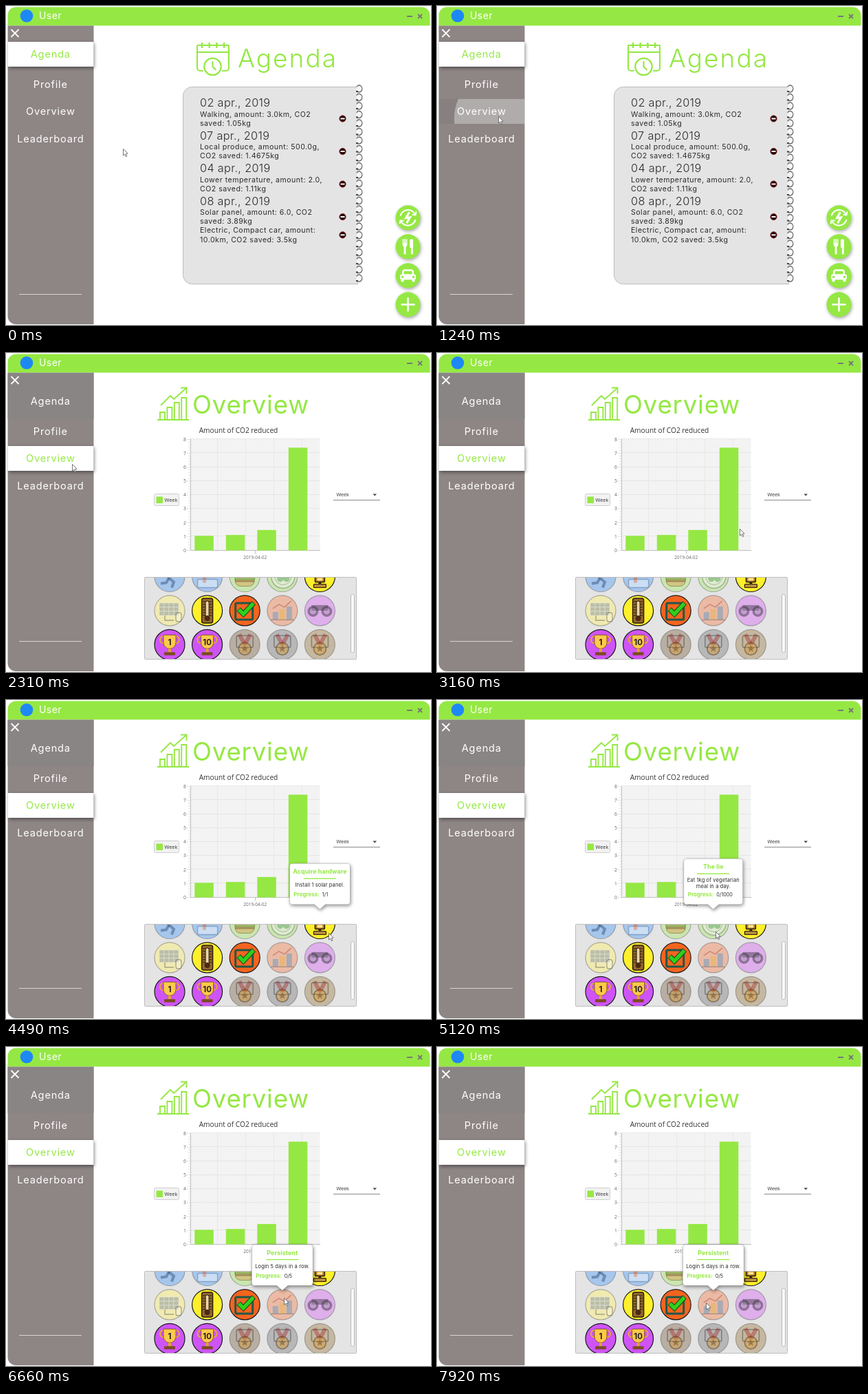
Recreate the animation shown at these times as an HTML page with a canvas. Size 618 px wide and 463 px high, loop 7990 ms.

```html
<!DOCTYPE html>
<html lang="en">
<head>
<meta charset="utf-8">
<title>Agenda and overview</title>
<style>
html, body { margin: 0; width: 100%; height: 100%; overflow: hidden; background: #fff; }
canvas { display: block; width: 100vw; height: 100vh; }
</style>
</head>
<body>
<canvas id="stage" width="618" height="463"></canvas>
<script>
const ctx = document.getElementById('stage').getContext('2d');
const LOOP = 7990, TICK = 76, SWITCH = 1380;
const GREEN = '#95e843', SIDE = '#8e8585', INK = '#2b2b2b';
const SANS = 'Inter, "Open Sans", sans-serif';

// ---------- helpers ----------
const smooth = v => v * v * (3 - 2 * v);
const times = (n, f) => Array.from({ length: n }, (_, i) => f(i));

// Progress in equal jumps, one per tick, the first at a and the last at b.
function steps(t, a, b) {
  if (t < a) return 0;
  if (t >= b) return 1;
  const n = Math.round((b - a) / TICK);
  return (Math.floor((t - a) / (b - a) * n + 1e-6) + 1) / (n + 1);
}

function setFont(size, w = 400, gap = 0.02, font = SANS) {
  ctx.font = `${w} ${size}px ${font}`;
  ctx.letterSpacing = gap * size + 'px';
}

function text(s, x, y, size, color, { w, align = 'left', gap, font } = {}) {
  setFont(size, w, gap, font);
  ctx.textAlign = align;
  ctx.fillStyle = color;
  ctx.fillText(s, x, y);
}

function rect(x, y, w, h, color) {
  ctx.fillStyle = color;
  ctx.fillRect(x, y, w, h);
}

function paint(fill, stroke, lw = 1) {
  if (fill) { ctx.fillStyle = fill; ctx.fill(); }
  if (stroke) { ctx.strokeStyle = stroke; ctx.lineWidth = lw; ctx.stroke(); }
}

function box(x, y, w, h, r, fill, stroke, lw) {
  ctx.beginPath();
  ctx.roundRect(x, y, w, h, r);
  paint(fill, stroke, lw);
}

function disc(x, y, r, fill, stroke, lw) {
  ctx.beginPath();
  ctx.arc(x, y, r, 0, 7);
  paint(fill, stroke, lw);
}

// Points are a flat list: x, y, x, y ...
function trace(pts, close) {
  ctx.beginPath();
  for (let i = 0; i < pts.length; i += 2) ctx.lineTo(pts[i], pts[i + 1]);
  if (close) ctx.closePath();
}
function line(color, lw, ...pts) { trace(pts); paint(null, color, lw); }

function cross(x, y, r, color) {
  line(color, 1.8, x - r, y - r, x + r, y + r);
  line(color, 1.8, x + r, y - r, x - r, y + r);
}

function star(x, y, r, color) {
  trace(times(10, i => {
    const a = (i / 5 - 0.5) * Math.PI, k = i % 2 ? r * 0.4 : r;
    return [x + k * Math.cos(a), y + k * Math.sin(a)];
  }).flat(), true);
  paint(color);
}

function shadow(alpha, draw) {
  ctx.save();
  ctx.shadowBlur = 5;
  ctx.shadowOffsetX = 1;
  ctx.shadowOffsetY = 2;
  ctx.shadowColor = `rgba(0,0,0,${alpha})`;
  draw();
  ctx.restore();
}

function at(x, y, draw) {
  ctx.save();
  ctx.translate(x, y);
  draw();
  ctx.restore();
}

// ---------- pointer ----------
// Start, end, then the place reached
const MOVES = [
  [80, 690, 89, 159.5],
  [2250, 3010, 405, 226.5],
  [3090, 3160, 439.5, 254.5],
  [3240, 3800, 470.5, 338.5],
  [4490, 5190, 403.5, 335.5],
  [6110, 6890, 404.5, 370.5],
  [7920, 7920, 390.5, 370.5]
];

function pointerAt(t) {
  return MOVES.reduce(([x, y], [a, b, px, py]) => {
    const k = smooth(steps(t, a, b));
    return [x + (px - x) * k, y + (py - y) * k];
  }, [169.5, 206.5]);
}

function pointer(t) {
  const [x, y] = pointerAt(t);
  at(Math.round(x) + 0.5, Math.round(y) + 0.5, () => {
    trace([0, 0, 0, 9.5, 2.2, 7.6, 3.8, 11.2, 5.3, 10.5, 3.8, 7, 6.6, 6.6], true);
    paint('#fff', '#555', 0.8);
  });
}

// ---------- window frame and menu ----------
const MENU = { Agenda: 70, Profile: 114, Overview: 153.3, Leaderboard: 193 };

function chrome() {
  rect(0, 0, 618, 463, '#fff');
  box(2.5, 1.5, 614, 27, [12, 12, 0, 0], GREEN);
  disc(30, 14.3, 9.3, '#1e88f5');
  text('User', 48, 19.3, 14, '#fff', { gap: 0.03 });
  rect(583, 14, 8, 2, '#777');
  cross(602, 15, 3, '#777');
}

function sidebar(t) {
  const overview = t >= SWITCH, on = overview ? 'Overview' : 'Agenda';
  const fade = overview ? 0.5 + 0.5 * steps(t, SWITCH, SWITCH + 400) : 1;
  box(2.5, 28.5, 125, 433.5, [0, 0, 0, 12], SIDE);
  if (overview) rect(2.5, 29, 125, 67, '#898584');
  cross(13, 39.5, 5.5, '#fff');
  rect(19, 418, 91, 1, '#d8d4d4');

  const shade = Math.round(142 + 113 * fade);
  shadow(0.45, () => rect(2.5, Math.round(MENU[on] - 18), 125, 36, `rgb(${shade},${shade},${shade})`));

  if (!overview && t >= 1090) {
    ctx.save();
    ctx.beginPath();
    ctx.rect(2.5, 135, 125, 36);
    ctx.clip();
    rect(2, 135, 126, 36, 'rgba(0,0,0,.04)');
    disc(92, 163, 67 * steps(t, 1090, 1240), 'rgba(255,255,255,.34)');
    ctx.restore();
  }

  for (const [s, y] of Object.entries(MENU)) {
    ctx.globalAlpha = s === on ? fade : 1;
    text(s, 64.8, y + 5.1, 14.6, s === on ? GREEN : '#fff', { align: 'center', gap: 0.055 });
  }
  ctx.globalAlpha = 1;
}

// ---------- agenda ----------
const ENTRIES = [
  ['02 apr., 2019', ['Walking, amount: 3.0km, CO2', 'saved: 1.05kg']],
  ['07 apr., 2019', ['Local produce, amount: 500.0g,', 'CO2 saved: 1.4675kg']],
  ['04 apr., 2019', ['Lower temperature, amount: 2.0,', 'CO2 saved: 1.11kg']],
  ['08 apr., 2019', ['Solar panel, amount: 6.0, CO2', 'saved: 3.89kg'],
    ['Electric, Compact car, amount:', '10.0km, CO2 saved: 3.5kg']]
];

function calendarIcon() {
  box(278, 57, 46, 37, [1, 1, 4, 4], null, GREEN, 2.1);
  line(GREEN, 2, 278, 67, 324, 67);
  times(4, i => line(GREEN, 2.4, 285 + 10.7 * i, 53, 285 + 10.7 * i, 61));
  disc(300.5, 88, 15, '#fff');
  disc(300.5, 88, 12.2, null, GREEN, 2.3);
  line(GREEN, 2.1, 300.5, 80, 300.5, 88, 305.5, 93);
}

function ring(y) {
  ctx.beginPath();
  ctx.ellipse(513.5, y, 4.3, 5, 0, -2.6, 2.5);
  paint('#f6f6f6', '#666', 1.3);
  rect(509, y + 3, 3, 2, '#444');
}

function notebook() {
  box(257.5, 117.5, 254, 286, [13, 0, 0, 13], '#e4e4e4', '#bcbcbc');
  times(23, i => ring(120 + 12.5 * i));
  let y = 146;
  for (const [day, ...items] of ENTRIES) {
    text(day, 282, y, 16.3, INK, { w: 300, gap: 0.02 });
    y += 14.5;
    for (const rows of items) {
      rows.forEach((s, i) => text(s, 282, y + 13.3 * i, 10.6, INK, { gap: 0.045 }));
      disc(489.5, y + 3, 4.6, '#240505', '#7d1216', 0.9);
      rect(486.5, y + 2, 6, 2, '#fff');
      y += 26.3;
    }
    y += 6.7;
  }
}

const FABS = [
  function energy() {
    for (const a of [0, Math.PI]) {
      ctx.save();
      ctx.rotate(a);
      ctx.beginPath();
      ctx.arc(0, 0, 11.3, -2.9, -0.5);
      paint(null, '#fff', 2);
      line('#fff', 2, 12, -9, 11, -4, 6, -4.5);
      ctx.restore();
    }
    line('#fff', 3, 2, -8, -3, 0.5, 3, -0.5, -2, 8);
  },
  function cutlery() {
    times(3, i => line('#fff', 1.6, -7 + 2.5 * i, -11, -7 + 2.5 * i, -4));
    box(-7.8, -5, 6.6, 5, [0, 0, 3, 3], '#fff');
    box(2.5, -11, 5, 13, [4, 3, 0, 3], '#fff');
    for (const x of [-4.5, 5.8]) line('#fff', 2.8, x, -2, x, 11);
  },
  function car() {
    box(-8.5, -9, 17, 12, 4, '#fff');
    box(-6, -6.5, 12, 5, 1, GREEN);
    box(-11.5, -2, 23, 8, 3, '#fff');
    for (const x of [-8, 8]) {
      box(x - 2, 4, 4, 5, 1, '#fff');
      disc(x, 2, 1.8, GREEN);
    }
  },
  function plus() {
    rect(-10, -1.3, 20, 2.6, '#fff');
    rect(-1.3, -10, 2.6, 20, '#fff');
  }
];

function agenda() {
  calendarIcon();
  text('Agenda', 337, 88.5, 37, GREEN, { w: 300, gap: 0.055 });
  notebook();
  FABS.forEach((icon, i) => at(584.5, 307.3 + 42 * i, () => {
    shadow(0.35, () => disc(0, 0, 18, GREEN));
    icon();
  }));
}

// ---------- overview ----------
function growthIcon() {
  line(GREEN, 2, 220, 97, 266, 97);
  times(4, i => box(224 + 10.4 * i, 86 - 7 * i, 7, 11 + 7 * i, 0, null, GREEN, 1.9));
  line(GREEN, 1.9, 225, 76, 239, 62, 244, 67, 262, 51);
  line(GREEN, 1.9, 254, 50.5, 262.5, 50.5, 262.5, 59);
}

function chart() {
  const label = { font: '"Open Sans", sans-serif', gap: 0 };
  const left = 268.5, base = 286.5, unit = 20.15;
  text('Amount of CO2 reduced', 338, 116, 10.2, '#333', { ...label, align: 'center' });
  rect(left, 125, 188, 162, '#f3f3f3');
  ctx.setLineDash([2, 1]);
  times(4, i => line('#e2e2e2', 1, 307.5 + 41 * i, 125, 307.5 + 41 * i, base));
  times(41, i => {
    const y = base - i * unit / 5, major = i % 5 === 0;
    if (major) line('#dedede', 1, left, Math.round(y) - 0.5, 456, Math.round(y) - 0.5);
    if (major) text(i / 5, 262, y + 2.3, 6.8, '#666', { ...label, align: 'right' });
    line('#c4c4c4', 0.7, major ? 263 : 265.5, y, left, y);
  });
  ctx.setLineDash([]);
  line('#c0c0c0', 1, left, 125, left, base, 457, base);
  line('#c0c0c0', 1, 362.5, base, 362.5, base + 5);
  text('2019-04-02', 362.3, 299, 6.5, '#666', { ...label, align: 'center' });
  [1.05, 1.11, 1.47, 7.4].forEach((v, i) => rect(274.3 + 45.5 * i, base - v * unit, 27.5, v * unit, GREEN));

  box(215.5, 204.5, 36, 17, 2, '#f2f2f2', '#cfcfcf');
  rect(218.5, 208.5, 9.5, 9.5, GREEN);
  text('Week', 230.5, 216, 7.4, '#333', label);
  text('Week', 480.5, 208.3, 7.2, '#333', label);
  trace([533.5, 204.5, 539, 204.5, 536.2, 207.5], true);
  paint('#444');
  rect(476, 213, 68, 1, '#8a8a8a');
}

function trophy(n) {
  for (const x of [-9, 9]) disc(x, -7, 5, null, '#e2a92c', 2);
  box(-9, -14, 18, 20, [1, 1, 9, 9], '#ffc94a', '#6b4a10', 0.8);
  rect(-2, 6, 4, 6, '#e0a32c');
  box(-8, 11, 16, 4.5, 1, '#7c4b22');
  text(n, 0, 0.5, 11.5, '#222', { w: 700, align: 'center', gap: 0 });
}

const ART = {
  runner() {
    line('#1f3f6d', 4, 3, -8, -1, 2, 6, 8, 3, 16);
    line('#1f3f6d', 4, -1, 2, -5, 9, -13, 10);
  },
  pin() {
    box(-14, 4, 29, 12, 2, '#fff', '#3f638e', 1.4);
    line('#e8642c', 5, -4, -4, -4, 9);
    disc(-4, -3, 6, '#e8642c');
  },
  burger() {
    box(-14, -8, 28, 22, 8, '#d99a45', '#55401e');
    rect(-15, 2, 30, 3, '#3f9a36');
    rect(-14, 5, 28, 3, '#69401f');
  },
  plate() {
    disc(1, 0, 17, '#f4f4f4', '#555', 1.3);
    disc(1, 0, 12, '#dfead4', '#666');
    for (const x of [-3, 6]) disc(x, 3, 4.7, '#3c9638');
  },
  hardware() {
    box(-7, -12, 14, 20, 1, '#b77426', '#2a1c08', 1.4);
    box(-4, 2, 8, 4, 1, '#ffe98a');
    rect(-2, 8, 4, 4, '#3a2a14');
    box(-9, 11, 18, 5, 1, '#b98d3c', '#2a1c08', 1.2);
  },
  solar() {
    times(12, i => box(-15 + 7 * (i % 4), -11 + 6 * Math.floor(i / 4), 7, 6, 0, '#75818e', '#e8eef2'));
    line('#444', 1.5, -7, 7, -7, 14, 6, 14);
    box(9, 3, 8, 13, 3, '#f8f6e0', '#333', 1.2);
  },
  thermometer() {
    box(-8, -18, 16, 36, 3, '#94672f', '#2b1c0a', 1.5);
    times(6, i => line('#2b1c0a', 1, -6.5, 4 * i - 13, 6.5, 4 * i - 13));
    box(-2.5, -14, 5, 24, 2.5, '#e9d6a4', '#2b1c0a');
    disc(0, 11, 4, '#4a2a12');
  },
  check() {
    box(-13.5, -11, 25, 24, 2, null, '#22574a', 3);
    line('#174d1e', 7.5, -9, -2, -2, 5, 13, -11);
    line('#2fd01c', 5.2, -8.5, -1.5, -2, 5, 12.5, -10.5);
  },
  bars() {
    times(3, i => rect(-14 + 10 * i, 2 - 4 * i, 8, 11 + 4 * i, i === 1 ? '#e3b440' : '#4d95c8'));
    line('#a24335', 1.6, -14, -3, -5, -9, 3, -5, 13, -14);
    line('#555', 1.2, -17, 13.5, 17, 13.5);
  },
  binoculars() {
    rect(-12, -8, 24, 8, '#2e2a33');
    for (const x of [-10, 10]) disc(x, 1, 6.3, '#9e86aa', '#2e2a33', 3.4);
  },
  first: () => trophy('1'),
  tenth: () => trophy('10'),
  medal() {
    for (const x of [-8, 8]) line('#a32c2c', 6, x, -15, 0, 0);
    box(-12, -13, 24, 17, 2, null, '#333', 1.6);
    disc(0, 6, 9, '#d9962e', '#3a2a18', 1.8);
    star(0, 6, 5.8, '#54371c');
  }
};

// Art, disc colour, earned
const BADGES = [
  ['runner', '#4f9bf5'], ['pin', '#4f9bf5'], ['burger', '#a4e668'], ['plate', '#a4e668'], ['hardware', '#fff02c', true],
  ['solar', '#fff06a'], ['thermometer', '#fff02c', true], ['check', '#f4641f', true], ['bars', '#f47f4c'], ['binoculars', '#d465f2'],
  ['first', '#cf54f8', true], ['tenth', '#cf54f8', true], ['medal', '#7d6347'], ['medal', '#777777'], ['medal', '#9c7a42']
].map(([art, color, earned], i) => ({ art, color, earned, x: 238 + 54.6 * (i % 5), y: 324.5 + 49.4 * Math.floor(i / 5) }));

function badges() {
  box(201.5, 325.5, 308, 119, 1, '#e4e4e4', '#bdbdbd');
  ctx.save();
  ctx.beginPath();
  ctx.rect(202, 326, 307, 118);
  ctx.clip();
  for (const { art, color, earned, x, y } of BADGES) at(x, y, () => {
    ctx.globalAlpha = earned ? 1 : 0.42;
    disc(0, 0, 22, color, earned ? '#1a1a1a' : '#555', 1.2);
    ART[art]();
  });
  ctx.restore();
  box(501.5, 350.5, 5, 84, 2, '#f8f8f8', '#b9b9b9');
}

const TIPS = {
  hardware: ['Acquire hardware', '1/1', 'Install 1 solar panel.'],
  plate: ['The lie', '0/1000', 'Eat 1kg of vegetarian', 'meal in a day.'],
  bars: ['Persistent', '0/5', 'Login 5 days in a row.']
};

function hovers(t, { x, y }) {
  const [px, py] = pointerAt(t);
  return py > 325 && Math.hypot(px - x, py - y) < 22.5;
}

// The card sits above its badge and is as wide as its longest line.
function tooltip(t, badge) {
  const alpha = times(3, i => hovers(t - TICK * i, badge)).filter(Boolean).length / 3;
  if (!alpha) return;
  const [title, score, ...rows] = TIPS[badge.art];
  const head = [8.9, 700, 0.01], body = [7.5, 400, 0.015];
  const width = (s, font) => { setFont(...font); return ctx.measureText(s).width; };
  const w = 9 + Math.max(width(title, head), ...rows.map(s => width(s, body)));
  const h = 52 + 7 * rows.length, mid = badge.x, x = mid - w / 2, b = badge.y - 28, y = b - h;

  ctx.save();
  ctx.globalAlpha = alpha;
  ctx.beginPath();
  ctx.roundRect(x, y, w, h, 4);
  ctx.moveTo(mid - 8, b);
  ctx.lineTo(mid, b + 7);
  ctx.lineTo(mid + 8, b);
  shadow(0.4, () => paint('#fff', '#8c8c8c', 0.8));
  paint('#fff');
  text(title, mid, y + 14.8, head[0], GREEN, { w: head[1], gap: head[2], align: 'center' });
  rect(mid - 23.5, y + 21, 47, 1.3, GREEN);
  rows.forEach((s, i) => text(s, mid, y + 33.7 + 9.2 * i, body[0], INK, { gap: body[2], align: 'center' }));
  text('Progress:', x + 5.5, b - 11.3, 7.9, GREEN, { w: 700, gap: 0.01 });
  text(score, x + 47, b - 11.3, 7.2, INK, { gap: 0 });
  ctx.restore();
}

function overview(t) {
  growthIcon();
  text('Overview', 271, 88, 36.6, GREEN, { gap: 0.022 });
  chart();
  badges();
  BADGES.filter(b => TIPS[b.art]).forEach(b => tooltip(t, b));
}

function frame() {
  const t = (performance.now() - start) % LOOP;
  chrome();
  sidebar(t);
  if (t < SWITCH) agenda();
  else overview(t);
  pointer(t);
  requestAnimationFrame(frame);
}

const start = performance.now();
frame();
</script>
</body>
</html>
```
